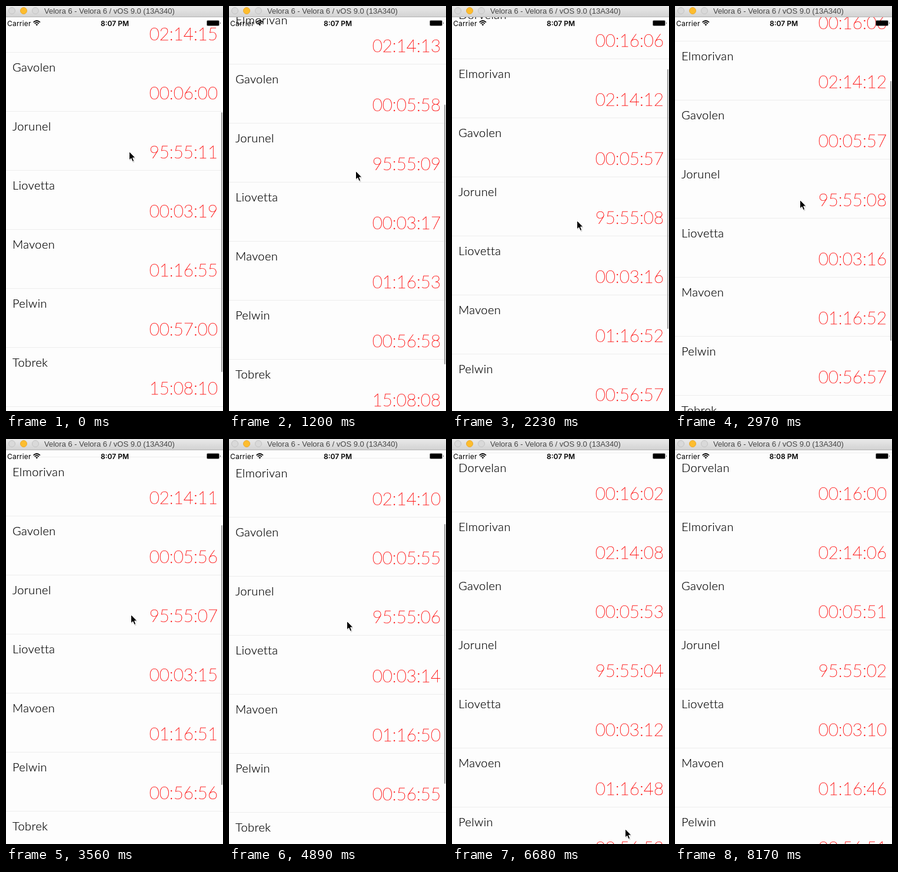
Animation, 369 px wide and 686 px high, one loop 8.52 s. Source, as an HTML page:

```html
<!DOCTYPE html>
<html lang="en">
<head>
<meta charset="utf-8">
<title>Countdown list</title>
<style>
  html, body { margin: 0; width: 100%; height: 100%; overflow: hidden; background: #fdfdfd; }
  #stage { position: relative; width: 369px; height: 686px; overflow: hidden; }
  #stage > *, .row > * { position: absolute; white-space: nowrap; }
  #list { left: 0; top: 0; width: 369px; }
  .row { position: relative; height: 100px; }
  .row::before { content: ""; position: absolute; top: 0; width: 100%; height: 1px; background: #ededed; }
  .name { left: 11px; top: 13px; font: 300 20px/24px Lato, sans-serif; letter-spacing: .4px;
          color: #000; -webkit-text-stroke: .2px #000; }
  .time { right: 9px; top: 49px; font: 200 29.5px/40px Lato, sans-serif; color: #f11; -webkit-text-stroke: .45px #f11; }
  #bar { left: 365.5px; top: 0; width: 2.5px; height: 440px; border-radius: 2px; background: #9c9c9c; }
  .status { top: 22px; font: 12px/15px Inter, sans-serif; color: #000; }
  #carrier { left: 2px; letter-spacing: .2px; }
  #clock { left: 0; width: 370px; text-align: center; font-weight: 600; }
  #title { left: 0; top: 0; width: 369px; height: 18px; border-bottom: 1px solid #b4b4b4;
           background: linear-gradient(#e9e9e9, #d3d3d3); }
  #title span { position: absolute; left: 65px; font: 13px/17px "Liberation Sans", Arial, sans-serif; color: #454545; }
  svg { left: 0; top: 0; }
</style>
</head>
<body>
<div id="stage">
  <div id="list"></div>
  <div id="bar"></div>
  <div id="carrier" class="status">Carrier</div>
  <div id="clock" class="status"></div>
  <div id="title"><span>Velora 6 - Velora 6 / vOS 9.0 (13A340)</span></div>
  <svg width="369" height="686">
    <g fill="#d9d9d9" stroke="#c3c3c3">
      <circle cx="10" cy="8" r="5.5"/>
      <circle cx="30" cy="8" r="5.5" fill="#fdbd2e" stroke="#e9a930"/>
      <circle cx="50" cy="8" r="5.5"/>
    </g>
    <g fill="none" stroke="#000" stroke-width="1.7">
      <path d="M46.6 27.6Q52.3 22.4 58 27.6M48.7 29.8Q52.3 26.6 55.9 29.8"/>
      <path d="M50.3 31.2Q52.3 29.6 54.3 31.2L52.3 33.4Z" fill="#000" stroke="none"/>
    </g>
    <rect x="341.5" y="24.5" width="21" height="9" rx="1.5" fill="none" stroke="#000" stroke-opacity=".45"/>
    <rect x="342" y="25" width="20" height="8" rx="1"/>
    <path d="M364 27.3q1.8 1.7 0 3.4z"/>
    <g id="cursor">
      <path d="M1 2V16L4 13.3L6.5 19L9.2 18L7 12.4H11Z" opacity=".15"/>
      <path d="M0 0V14.5L3.3 11.5L5.6 17L8.2 16L6 10.6H10.4Z" stroke="#fff"/>
    </g>
  </svg>
</div>
<script>
const LOOP = 8520, STEP = 148.3;
const $ = id => document.getElementById(id);

const people = [
  ["Dorvelan", "00:16:09"], ["Elmorivan", "02:14:15"], ["Gavolen", "00:06:00"], ["Jorunel", "95:55:11"],
  ["Liovetta", "00:03:19"], ["Mavoen", "01:16:55"], ["Pelwin", "00:57:00"], ["Tobrek", "15:08:10"],
];

// Each gesture eases the list by `list` and the cursor by dx, dy between two steps.
const gestures = [
  { from: 0, to: 4, list: -14 },
  { from: 5, to: 8, dx: 7, dy: 2 },
  { from: 4.6, to: 14.5, list: 125, dx: -4, dy: 115 },
  { from: 16, to: 22, list: -40, dy: -47 },
  { from: 23, to: 24, list: -19, dy: -19 },
  { from: 30, to: 33, dx: -12, dy: 9 },
  { from: 32.5, to: 36.5, list: 49, dx: -2, dy: 57 },
  { from: 37.8, to: 39.5, list: 44 },
  { from: 40, to: 47, dx: 120, dy: 370 },
];

const clamp = u => Math.min(1, Math.max(0, u));
const ease = u => u * u * (3 - 2 * u);
const moved = (part, step) => Math.round(gestures.reduce((sum, g) =>
  sum + (g[part] || 0) * ease(clamp((step - g.from) / (g.to - g.from))), 0));

const toSeconds = text => text.split(":").reduce((sum, n) => sum * 60 + Number(n), 0);
const pad = n => String(Math.floor(n)).padStart(2, "0");
const toText = s => [s / 3600, s / 60 % 60, s % 60].map(pad).join(":");

function addRow(name) {
  const row = document.createElement("div");
  row.className = "row";
  row.innerHTML = `<span class="name">${name}</span><span class="time"></span>`;
  $("list").append(row);
  return row.lastChild;
}
const timers = people.map(([name, left]) => ({ label: addRow(name), left: toSeconds(left) }));
addRow("");

function draw(now) {
  const step = Math.floor((now % LOOP + 6) / STEP);
  const ticks = Math.floor((step * STEP + 885) / 1000);
  const scroll = moved("list", step);

  $("list").style.transform = `translateY(${scroll - 122}px)`;
  for (const { label, left } of timers) label.textContent = toText(left - ticks);
  $("bar").style.transform = `translateY(${Math.round(180 - scroll * 0.658)}px)`;
  $("bar").style.opacity = clamp((44 - step) / 2);
  $("cursor").setAttribute("transform",
    `translate(${209.5 + moved("dx", step)} ${246.5 + moved("dy", step)})`);
  $("clock").textContent = step < 53 ? "8:07 PM" : "8:08 PM";
}

const start = performance.now();
(function frame() {
  draw(performance.now() - start);
  requestAnimationFrame(frame);
})();
</script>
</body>
</html>
```
